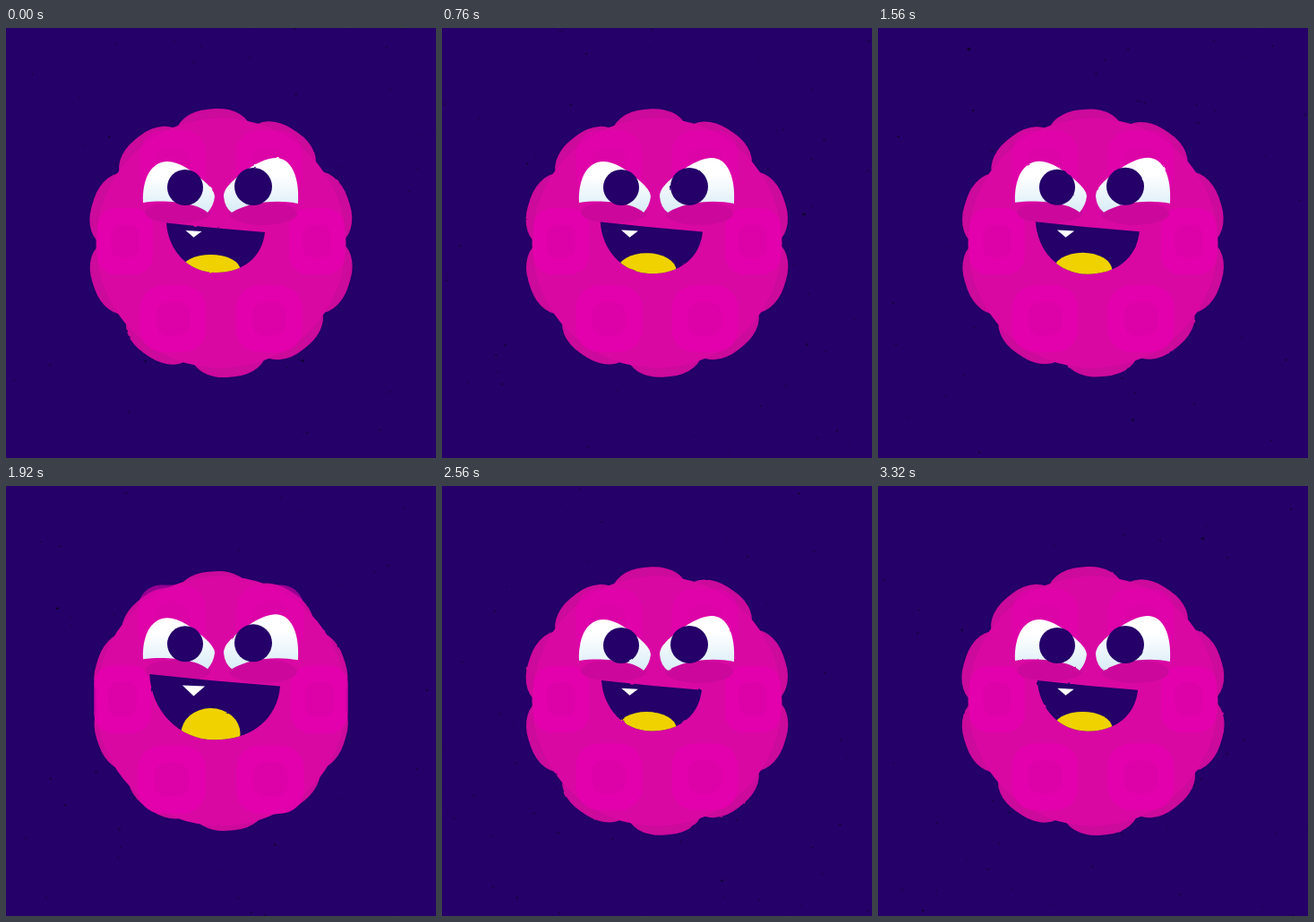
An HTML page for the animation above (3.36 s loop, 480 by 480 pixels).

```html
<!DOCTYPE html>
<html>
<head>
<meta charset="utf-8">
<style>
html, body { margin: 0; width: 100%; height: 100%; overflow: hidden; background: #240068; }
svg { display: block; width: 100vw; height: 100vh; }
</style>
</head>
<body>
<svg viewBox="0 0 480 480">
  <defs>
    <filter id="rough" filterUnits="userSpaceOnUse" x="0" y="0" width="480" height="480" color-interpolation-filters="sRGB">
      <feTurbulence id="noise" type="fractalNoise" baseFrequency=".12"/>
      <feDisplacementMap in="SourceGraphic" scale="2" xChannelSelector="R" yChannelSelector="G"/>
    </filter>
    <linearGradient id="white" x1="0" y1="0" x2="0" y2="1">
      <stop offset=".3" stop-color="#fff"/>
      <stop offset="1" stop-color="#d8ecf7"/>
    </linearGradient>
    <clipPath id="inMouth"><path id="mouthClip"/></clipPath>
  </defs>
  <path id="specks" fill="#10002e"/>
  <g filter="url(#rough)">
    <g id="back" fill="#cc0a9b"></g>
    <circle cx="240" cy="240" r="139.5" fill="#d908a3"/>
    <g id="front"></g>
    <g fill="#cc089c">
      <ellipse cx="192" cy="206" rx="37" ry="12"/>
      <ellipse cx="287" cy="207" rx="38" ry="13"/>
    </g>
    <g id="eyes">
      <path fill="url(#white)" d="M153 195C152 165 164 149 180 149C194 149 208 160 220 170Q233 181 233 188Q232 198 225 206C215 196 180 191 153 195Z"/>
      <path fill="url(#white)" d="M326 196C328 165 318 145 301 145C286 145 264 160 250 174Q243 181 243 188Q244 200 252 206C270 195 300 191 326 196Z"/>
      <g fill="#240068">
        <circle cx="200" cy="178" r="20"/>
        <circle cx="276" cy="177" r="21"/>
      </g>
    </g>
    <path id="mouth" fill="#240068"/>
    <g clip-path="url(#inMouth)"><ellipse id="tongue" cx="228.5" rx="33" fill="#efd200"/></g>
    <path id="tooth" fill="#fff"/>
  </g>
</svg>
<script>
const STEP = 40, LOOP = 3360, BEAT = 840;
const { sin, cos, PI } = Math;
const $ = id => document.getElementById(id);
const mix = (a, b, k) => a + (b - a) * k;
const set = (el, attrs) => { for (const k in attrs) el.setAttribute(k, attrs[k]); };
const add = (parent, attrs) => {
  const el = document.createElementNS('http://www.w3.org/2000/svg', 'rect');
  set(el, attrs);
  return parent.appendChild(el);
};
const smooth = (a, b, t) => {
  const u = Math.min(1, Math.max(0, (t - a) / (b - a)));
  return u * u * (3 - 2 * u);
};

// Ten lumps peep out behind the ball, slightly tilted at top and bottom
const bumps = Array.from({ length: 10 }, (_, i) => {
  const a = i * 36 - 18;
  const turn = a + 90 - 4 * sin(a * PI / 180) ** 2;
  return add($('back'), { x: 198, width: 84, height: 90, rx: 38, ry: 27, transform: `rotate(${turn} 240 240)` });
});

// Six lumps sit in a ring on the front
const lumps = Array.from({ length: 6 }, (_, i) => ({
  angle: i * PI / 3,
  body: add($('front'), { fill: '#e400ad', opacity: i > 3 ? .6 : .9 }),
  core: add($('front'), { fill: '#d904a5', opacity: .5 })
}));

function box(el, x, y, w, h) {
  set(el, { x: x - w / 2, y: y - h / 2, width: w, height: h, rx: Math.min(w, h) * .34 });
}

function placeLump({ angle, body, core }, push) {
  const x = 240 + (107 + 5 * push) * cos(angle);
  const y = 238 + (100 + 6 * push) * sin(angle);
  const w = 78 - 16 * cos(angle) ** 2 + 3 * push;
  const h = 74 + 3 * push;
  box(body, x, y, w, h);
  box(core, x, y, w / 2, h / 2);
}

function random(seed) {
  return () => {
    seed = seed + 0x6D2B79F5 | 0;
    let t = Math.imul(seed ^ seed >>> 15, 1 | seed);
    t ^= t + Math.imul(t ^ t >>> 7, 61 | t);
    return ((t ^ t >>> 14) >>> 0) / 4294967296;
  };
}

function speckPath(frame) {
  const rnd = random(frame * 977 + 5);
  let d = '';
  for (let i = 0; i < 160; i++) {
    const x = rnd() * 480, y = rnd() * 480;
    const r = i ? .4 + 1.3 * rnd() ** 3 : 2.6;
    d += `M${x - r} ${y}L${x} ${y - r * rnd()}L${x + r} ${y - r * .3}L${x + r * .4} ${y + r * .8}Z`;
  }
  return d;
}

function mouthPath(open) {
  const left = 179 - 21 * open, leftY = 217.5 - 8.5 * open;
  const right = 289 + 19 * open, rightY = 228 - 5 * open;
  const bottom = 273 + 11.5 * open;
  const mid = (left + right) / 2, bend = (right - left) * .28;
  return `M${left} ${leftY}Q${mid} ${mix(leftY, rightY, .6)} ${right} ${rightY}`
    + `C${right - 3} ${mix(rightY, bottom, .62)} ${mid + bend} ${bottom} ${mid} ${bottom}`
    + `C${mid - bend} ${bottom} ${left + 2} ${mix(leftY, bottom, .55)} ${left} ${leftY}Z`;
}

function toothPath(open) {
  const half = 9 + 4 * open, y = 226 - 4 * open;
  return `M${209.5 - half} ${y}L${209.5 + half} ${y + 1}L209.5 ${233.7 + open}Z`;
}

function draw(frame) {
  const t = frame * STEP % BEAT;
  const settle = Math.max(0, (t - 560) / 280);
  const open = t < 320
    ? smooth(0, 300, t)
    : 1 - .78 * smooth(330, 590, t) - .22 * settle ** 2;
  const squash = smooth(0, 320, t) - smooth(340, 820, t);
  const push = smooth(120, 340, t) - smooth(340, 700, t);

  set($('noise'), { seed: frame + 1 });
  set($('specks'), { d: speckPath(frame) });
  bumps.forEach(b => set(b, { y: 90 + 6 * squash }));
  lumps.forEach(l => placeLump(l, push));
  set($('eyes'), { transform: `translate(0 ${-2 * squash})` });

  const d = mouthPath(open);
  set($('mouth'), { d });
  set($('mouthClip'), { d });
  const lift = 1 - (1 - open) ** 4;
  const cy = 270 + 7 * open;
  set($('tongue'), { cy, ry: cy - 253 + 5 * lift });
  set($('tooth'), { d: toothPath(open) });
}

const start = performance.now();
let last = -1;
function tick() {
  const frame = Math.floor((performance.now() - start) % LOOP / STEP);
  if (frame !== last) draw(last = frame);
  requestAnimationFrame(tick);
}
tick();
</script>
</body>
</html>
```
